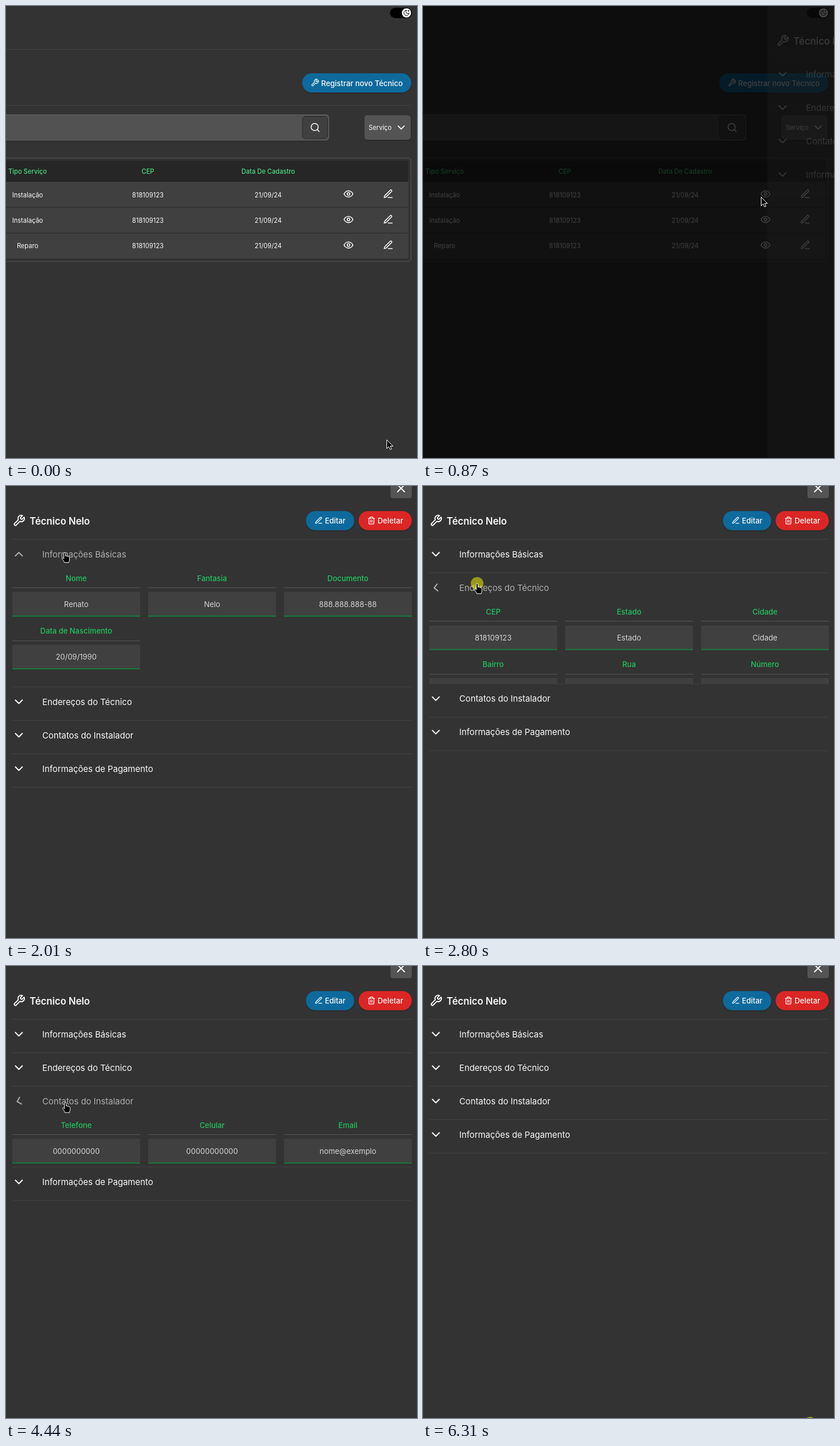
Write an HTML page that moves like this. It is 714 px wide and 784 px high and loops after 6.39 s.

```html
<!DOCTYPE html>
<html lang="pt-BR">
<head>
<meta charset="utf-8">
<title>Técnicos</title>
<style>
  html, body { margin: 0; width: 100%; height: 100%; overflow: hidden; background: #333; }
  svg { display: block; width: 714px; height: 784px; font-family: Inter, sans-serif; }
  .icon { fill: none; stroke-linecap: round; stroke-linejoin: round; }
  .pill { filter: drop-shadow(0 1px 1px rgba(0, 0, 0, .3)); }
</style>
</head>
<body>
<svg id="stage" viewBox="0 0 714 784" xmlns="http://www.w3.org/2000/svg"></svg>
<script>
const LOOP = 6390;
const WHITE = '#fafafa';
const ICONS = {
  wrench: 'M14.7 6.3a1 1 0 0 0 0 1.4l1.6 1.6a1 1 0 0 0 1.4 0l3.77-3.77a6 6 0 0 1-7.94 7.94l-6.91 6.91a2.12 2.12 0 0 1-3-3l6.91-6.91a6 6 0 0 1 7.94-7.94l-3.76 3.76z',
  pen: 'M12 20h9M16.5 3.5a2.12 2.12 0 0 1 3 3L7 19l-4 1 1-4Z',
  eye: 'M2 12s3-7 10-7 10 7 10 7-3 7-10 7-10-7-10-7ZM15 12a3 3 0 1 1-6 0 3 3 0 0 1 6 0Z',
  trash: 'M3 6h18M19 6v14c0 1-1 2-2 2H7c-1 0-2-1-2-2V6M8 6V4c0-1 1-2 2-2h4c1 0 2 1 2 2v2M10 11v6M14 11v6',
  search: 'M19 11a8 8 0 1 1-16 0 8 8 0 0 1 16 0ZM21 21l-4.3-4.3',
  moon: 'M12 3a6 6 0 0 0 9 9 9 9 0 1 1-9-9M19 3v4M21 5h-4',
  chevron: 'm6 9 6 6 6-6',
  close: 'M18 6 6 18M6 6l12 12'
};

// Drawing helpers; text and icons are placed by their vertical centre.
const rect = (x, y, w, h, fill, more = '') =>
  `<rect x="${x}" y="${y}" width="${w}" height="${h}" fill="${fill}" ${more}/>`;
const text = (x, y, size, str, { fill = WHITE, weight = 400, anchor = 'start' } = {}) =>
  `<text x="${x}" y="${y + size * .364}" font-size="${size}" font-weight="${weight}" fill="${fill}" text-anchor="${anchor}">${str}</text>`;
const icon = (name, x, y, size, color = WHITE, width = 2) =>
  `<path class="icon" d="${ICONS[name]}" stroke="${color}" stroke-width="${width}" transform="translate(${x} ${y}) scale(${size / 24}) translate(-12 -12)"/>`;
const button = (x, y, w, fill, iconName, label) =>
  rect(x, y, w, 33.3, fill, 'rx="16.6" class="pill"') +
  icon(iconName, x + 22.3, y + 16.3, 14.8) +
  text(x + 33, y + 17.2, 12.95, label, { weight: 500 });

function drawPage() {
  const head = (x, str) => text(x, 287, 11.1, str, { fill: '#4ade80', weight: 500, anchor: 'middle' });
  const cell = (x, y, str) => text(x, y, 11.1, str, { anchor: 'middle' });
  const rows = ['Instalação', 'Instalação', 'Reparo'].map((kind, i) => {
    const y = 305 + 44.3 * i;
    return rect(-10, y, 709, 44.3, '#404040') +
      (i ? rect(-10, Math.round(y) - .5, 709, 1, '#262626') : '') +
      cell(37.5, y + 22.6, kind) + cell(246.5, y + 22.6, '818109123') + cell(455.5, y + 22.6, '21/09/24') +
      `<g ${i ? '' : 'id="eye"'}>${icon('eye', 595, y + 21, 18.5)}</g>` + icon('pen', 664, y + 21, 18.5);
  }).join('');
  return rect(0, 0, 714, 784, '#333') +
    rect(667, 3, 38.5, 18, '#000', 'rx="9"') +
    `<circle cx="695.7" cy="12" r="8" fill="#fff"/>` + icon('moon', 695.7, 12, 12, '#000') +
    rect(0, 75, 704, 1, '#424242') + rect(0, 172, 704, 1, '#424242') +
    button(514.5, 116.7, 189.5, '#0e6a9c', 'wrench', 'Registrar novo Técnico') +
    rect(-20, 188.5, 581, 44.5, '#525252', 'rx="5" stroke="#606060" class="pill"') +
    rect(515, 191.5, 43.5, 38.5, '#404040', 'rx="5" stroke="#262626"') +
    icon('search', 537, 210.7, 18.5) +
    rect(622.5, 189.5, 80.5, 42.5, '#545454', 'rx="5" class="pill"') +
    text(630, 211, 11.1, 'Serviço') + icon('chevron', 686.5, 210.7, 21) +
    rect(-20, 263.5, 723.5, 179.5, 'none', 'rx="5" stroke="#565656"') +
    rect(-10, 268, 709, 37.5, '#262626') +
    head(37.5, 'Tipo Serviço') + head(246.5, 'CEP') + head(455.5, 'Data De Cadastro') +
    rows;
}

const sections = [
  { title: 'Informações Básicas', extra: 198, open: 1790, shut: 2340,
    fields: [['Nome', 'Renato'], ['Fantasia', 'Nelo'], ['Documento', '888.888.888-88'], ['Data de Nascimento', '20/09/1990']] },
  { title: 'Endereços do Técnico', extra: 289, open: 2765, shut: 3320,
    fields: [['CEP', '818109123'], ['Estado', 'Estado'], ['Cidade', 'Cidade'],
      ['Bairro', 'Centro'], ['Rua', 'Rua Exemplo'], ['Número', '88'], ['Complemento', 'Casa']] },
  { title: 'Contatos do Instalador', extra: 198, open: 3850, shut: 4390,
    fields: [['Telefone', '0000000000'], ['Celular', '00000000000'], ['Email', 'nome@exemplo'], ['Contato', 'Nelo']] },
  { title: 'Informações de Pagamento', extra: 106, open: 4940, shut: 5580,
    fields: [['Conta Corrente', '8888438483848'], ['Chave QIV', '12342342356'], ['Dia do Fechamento', '01/10/2024']] }
];

function drawField([label, value], i) {
  const x = 11 + 236 * (i % 3), y = 91.5 * Math.floor(i / 3), mid = x + 111;
  return text(mid, y + 68, 12.95, label, { fill: '#22c55e', weight: 500, anchor: 'middle' }) +
    rect(x, Math.round(y + 84), 222, 1, '#565656') +
    rect(x, y + 91.7, 222, 42.8, '#404040', 'rx="2"') +
    rect(x, y + 132.8, 222, 1.8, '#15803d', 'rx=".9"') +
    text(mid, y + 113, 12.95, value, { fill: '#d4d4d4', anchor: 'middle' });
}

function drawPanel() {
  const rows = sections.map((s, i) =>
    `<clipPath id="clip${i}"><rect id="mask${i}" x="0" y="0" width="714" height="58"/></clipPath>
    <g id="row${i}">
      <g id="head${i}"><g id="arrow${i}">${icon('chevron', 0, 0, 24)}</g>${text(63, 26.4, 14.8, s.title)}</g>
      <g id="body${i}" clip-path="url(#clip${i})">${s.fields.map(drawField).join('')}</g>
      <rect id="line${i}" x="11" width="694" height="1" fill="#424242"/>
    </g>`).join('');
  return rect(-4, 0, 760, 784, '#333') +
    rect(668, -16, 37, 37, '#545454', 'rx="4"') + icon('close', 686.3, 4, 24) +
    icon('wrench', 22.7, 60, 22.2) + text(41, 60.7, 16.65, 'Técnico Nelo', { weight: 600 }) +
    button(521, 43.5, 84, '#0e6a9c', 'pen', 'Editar') +
    button(612.5, 43.5, 92.5, '#dc2626', 'trash', 'Deletar') +
    rect(11, 92, 694, 1, '#424242') + rows;
}

const ARROW = 'M.5 .5V15.6L4 12.3l2.4 5.2 2.4-1.1-2.3-5h4.8Z';
const HAND = 'M-1.5 1.8a1.5 1.5 0 0 1 3 0V6.7c.4-1 2.3-.8 2.5.5.5-.9 2.2-.6 2.4.6.6-.6 2-.2 2 1.1V13c0 1.6-1.2 2.5-1.2 4.8H-.6C-.8 15.6-3 13.8-4.5 11c-.6-1.3.9-2.2 1.8-1.2l1.2 1.4Z';

document.getElementById('stage').innerHTML =
  `<g>${drawPage()}</g>` + rect(0, 0, 714, 784, '#000', 'id="shade"') +
  `<g id="panel">${drawPanel()}</g>
  <circle id="dot" r="11" fill="#ff0" fill-opacity=".5"/>
  <path id="cursor" fill="#000" stroke="#fff" stroke-width="1" stroke-linejoin="round"/>`;

const el = {};
document.querySelectorAll('[id]').forEach(n => { el[n.id] = n; });
const set = (id, name, value) => el[id].setAttribute(name, value);

const clamp = v => Math.min(1, Math.max(0, v));
const bezier = (x1, y1, x2, y2) => {
  const at = (a, b, s) => 3 * (1 - s) ** 2 * s * a + 3 * (1 - s) * s * s * b + s ** 3;
  return x => {
    x = clamp(x);
    if (x === 0 || x === 1) return x;
    let lo = 0, hi = 1;
    for (let i = 0; i < 24; i++) {
      const mid = (lo + hi) / 2;
      if (at(x1, x2, mid) < x) lo = mid; else hi = mid;
    }
    return at(y1, y2, lo);
  };
};
const ease = bezier(.25, .1, .25, 1);
const easeInOut = bezier(.4, 0, .2, 1);
const easeOut = bezier(0, 0, .2, 1);
const smooth = bezier(.35, 0, .65, 1);

// Pointer stops: time, x, y
const path = [
  [70, 661, 752], [640, 589, 331], [790, 589, 331], [870, 587, 331], [960, 530, 316], [1090, 200.5, 232], [1330, 102, 115],
  [2340, 102, 115], [2540, 94, 169], [3340, 94, 169], [3690, 100, 230], [4390, 100, 230],
  [4640, 129, 293], [5570, 129, 293], [5845, 665, 752], [5905, 672.5, 793]
];
const clicks = [
  [720, 780], [1690, 1785], [2270, 2335], [2740, 2805], [3210, 3350],
  [3760, 3890], [4300, 4368], [4780, 4910], [5510, 5575], [6310, LOOP]
];
const within = (t, [from, to]) => t >= from && t < to;

function pointer(t) {
  let i = path.findIndex(p => p[0] > t);
  if (i < 0) i = path.length;
  const a = path[Math.max(0, i - 1)], b = path[Math.min(i, path.length - 1)];
  const k = a === b ? 0 : smooth((t - a[0]) / (b[0] - a[0]));
  return [a[1] + (b[1] - a[1]) * k, a[2] + (b[2] - a[2]) * k];
}

function render(t) {
  const [px, py] = pointer(t);
  const slide = easeInOut((t - 771) / 455);
  set('shade', 'opacity', .8 * ease((t - 771) / 150));
  set('panel', 'opacity', slide);
  set('panel', 'transform', `translate(${726 * (1 - slide)} 0)`);
  set('eye', 'opacity', within(t, [620, 790]) ? .7 : 1);

  let top = 92;
  sections.forEach((s, i) => {
    const p = easeOut((t - s.open) / 200) - easeOut((t - s.shut) / 200);
    const height = 58 + s.extra * p;
    const hover = within(t, [1200, 5800]) && py >= top && py < top + 56;
    set('row' + i, 'transform', `translate(0 ${top})`);
    set('head' + i, 'opacity', hover ? .62 : 1);
    set('arrow' + i, 'transform', `translate(22.3 26.3) rotate(${180 * p})`);
    set('mask' + i, 'height', height);
    set('body' + i, 'visibility', p > 0 ? 'visible' : 'hidden');
    set('line' + i, 'y', height);
    top += height;
  });

  const hand = within(t, [620, 790]) || within(t, [1010, 5640]);
  set('cursor', 'd', hand ? HAND : ARROW);
  set('cursor', 'transform', `translate(${px} ${py})`);
  set('dot', 'cx', px);
  set('dot', 'cy', py);
  set('dot', 'visibility', clicks.some(c => within(t, c)) ? 'visible' : 'hidden');
}

const start = performance.now();
function tick() {
  render((performance.now() - start) % LOOP);
  requestAnimationFrame(tick);
}
tick();
</script>
</body>
</html>
```
